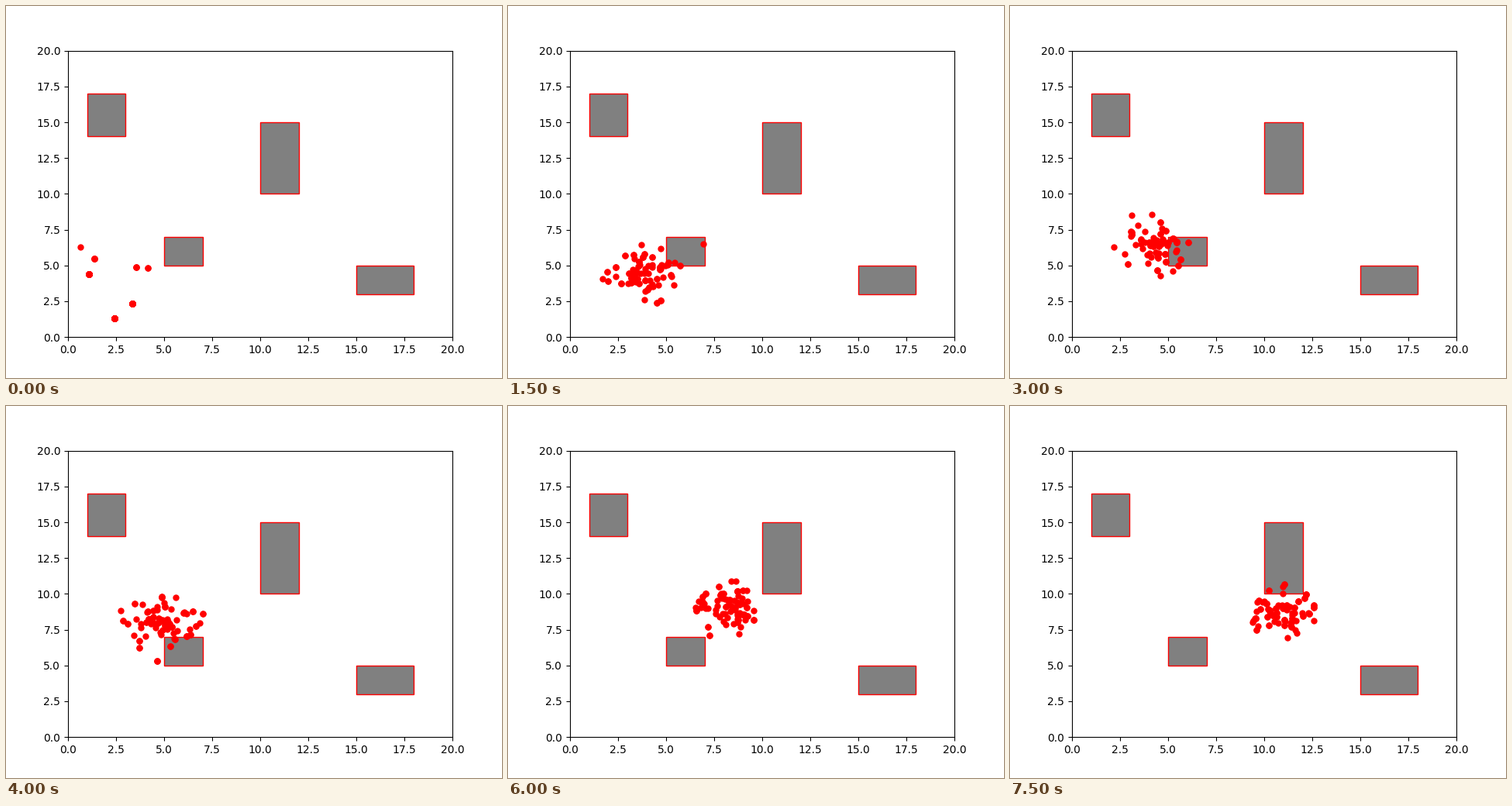
Write a matplotlib script that moves like this. It is 640 px wide and 480 px high and loops after 8000 ms.

```python
import matplotlib.pyplot as plt
import numpy as np
from matplotlib.animation import FuncAnimation
from matplotlib.patches import Rectangle

STEPS = 16
COUNT = 100
SPREAD = 0.85

# x, y, width, height
OBSTACLES = [(1, 14, 2, 3), (10, 10, 2, 5), (5, 5, 2, 2), (15, 3, 3, 2)]

# Survivors of the first resampling: x, y, copies
START = [
    (1.10, 4.37, 30), (3.36, 2.36, 30), (2.43, 1.33, 30), (1.38, 5.50, 4),
    (3.53, 4.90, 3), (0.66, 6.31, 1), (4.17, 4.80, 2),
]

# Path of the cloud's centre: step, x, y
PATH = [
    (1, 3.2, 3.3), (4, 4.2, 5.05), (5, 4.15, 5.6), (8, 4.9, 8.0),
    (10, 7.1, 7.9), (12, 8.2, 9.1), (15, 10.95, 8.75),
]


def centre(step):
    steps, xs, ys = zip(*PATH)
    return np.interp(step, steps, xs), np.interp(step, steps, ys)


def particles(step):
    if step == 0:
        x, y, copies = zip(*START)
        return np.repeat(x, copies), np.repeat(y, copies)
    rng = np.random.default_rng(step)
    noise = rng.normal(0, SPREAD, (2, COUNT))
    noise = noise[:, rng.integers(COUNT, size=COUNT)]  # resample
    noise -= noise.mean(axis=1, keepdims=True)
    return noise + np.array(centre(step))[:, None]


fig, ax = plt.subplots(figsize=(6.4, 4.8), dpi=100)
ax.set(xlim=(0, 20), ylim=(0, 20))
for x, y, w, h in OBSTACLES:
    ax.add_patch(Rectangle((x, y), w, h, facecolor="gray", edgecolor="red"))
dots, = ax.plot([], [], "ro", markersize=5)


def update(step):
    dots.set_data(*particles(step))
    return dots,


anim = FuncAnimation(fig, update, frames=STEPS, interval=500,
                     repeat=True, repeat_delay=0)
plt.show()
```
